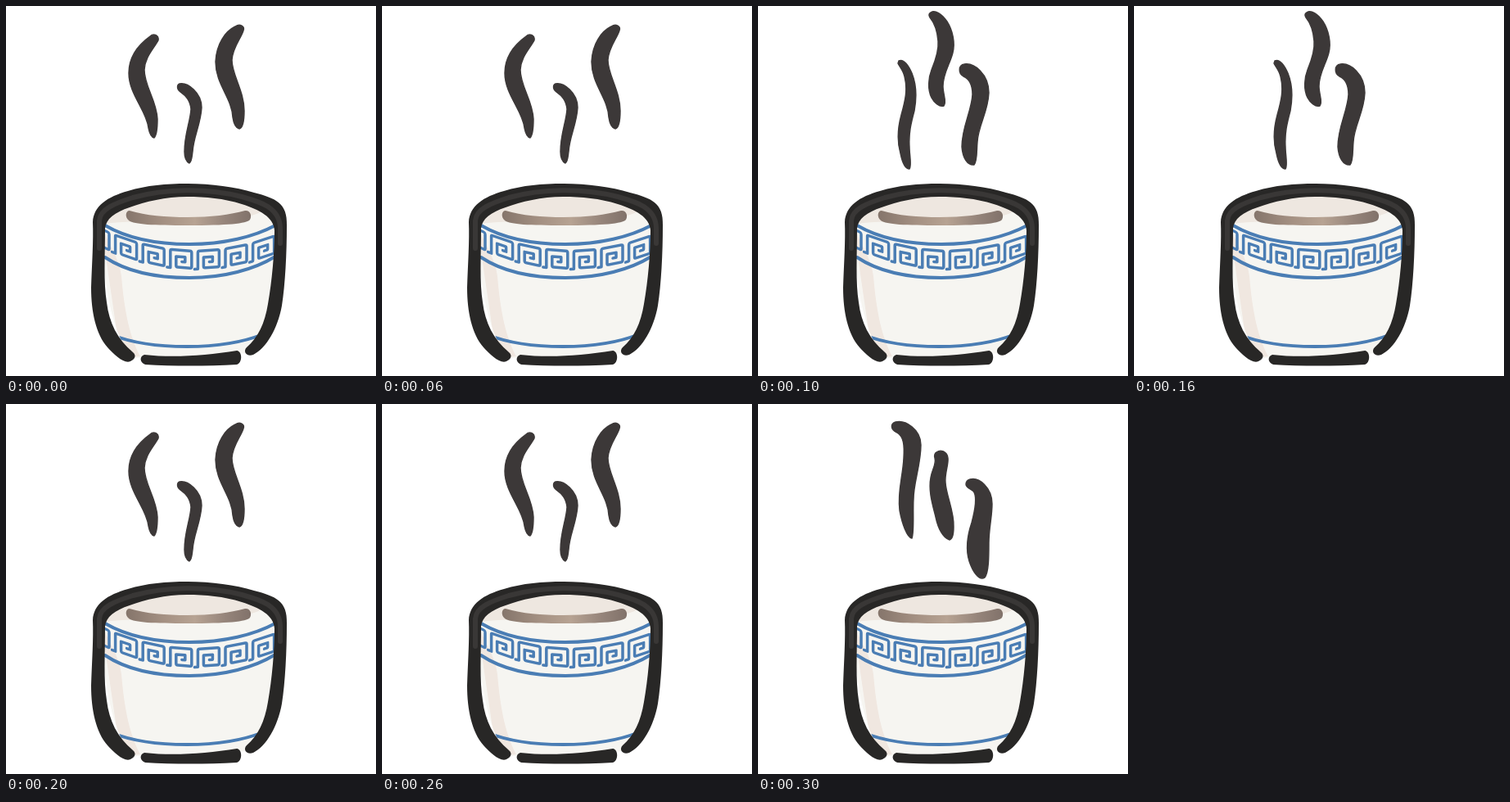
An HTML page for the animation above (0.4 s loop, 452 px wide and 452 px high).

```html
<!DOCTYPE html>
<html lang="en">
<head>
<meta charset="utf-8">
<title>Steaming tea cup</title>
<style>
  html, body { margin: 0; width: 100%; height: 100%; overflow: hidden; background: #fff; }
  svg { display: block; width: 100vw; height: 100vh; }
  .steam { fill: #3c3838; stroke: #3c3838; stroke-width: 1.4; opacity: 0; }
  .blue { fill: none; stroke: #4a7db4; stroke-width: 4; stroke-linecap: round; stroke-linejoin: round; }
  .ink { fill: #282726; }
</style>
</head>
<body>
<svg viewBox="0 0 452 452">
  <defs>
    <linearGradient id="tea">
      <stop offset="0" stop-color="#85756b"/>
      <stop offset=".3" stop-color="#a49082"/>
      <stop offset=".55" stop-color="#b7a393"/>
      <stop offset=".8" stop-color="#95847a"/>
      <stop offset="1" stop-color="#81726a"/>
    </linearGradient>
    <clipPath id="body">
      <path d="M117 262C124 246 165 226 221 226C278 226 324 244 330 264C333 320 324 390 300 424L155 430C128 402 117 330 117 262Z"/>
    </clipPath>
  </defs>

  <g clip-path="url(#body)">
    <rect x="110" y="220" width="230" height="220" fill="#f6f5f1"/>
    <path fill="#eee7e0" d="M120 266C135 240 180 230 221 230C265 230 300 239 314 250C302 258 270 264 221 264C180 264 150 262 120 266Z"/>
    <path fill="#f0e7e0" d="M116 266C124 290 138 306 141 330C144 365 149 400 164 428L140 430Z"/>
  </g>

  <path fill="url(#tea)" d="M151 250C171 256 195 258 222 258C250 258 274 255 292 250C298 249 301 256 298 261C294 266 270 268 222 268C180 268 157 267 150 262C145 258 146 250 151 250Z"/>

  <g clip-path="url(#body)" class="blue">
    <path d="M121 268C145 282 180 291 224 291C266 291 303 282 329 268"/>
    <path d="M121 307C145 323 180 332 224 332C266 332 303 322 329 306"/>
    <path d="M130 402C155 412 187 416 221 416C256 416 289 411 314 401"/>
    <g id="frieze" stroke-width="3.5"></g>
  </g>

  <path class="ink" d="M152 434C145 438 132 426 124 417C110 401 104 374 104 344C105 315 107 286 106 264C107 244 124 233 149 226C172 219 195 217 222 217C251 217 280 221 303 228C330 235 344 241 343 268C343 303 341 340 337 366C332 394 318 418 302 426C294 429 289 422 294 417C308 405 316 388 320 364C325 336 328 302 328 274C327 258 310 249 288 242C266 235 244 233 221 233C195 233 170 239 151 246C133 252 122 260 121 272C121 305 119 338 123 362C126 387 136 407 155 423C160 427 157 432 152 434Z"/>
  <path fill="none" stroke="#393736" stroke-width="6" stroke-linecap="round" d="M114 296V262C115 248 133 241 155 234C195 223 245 222 288 233C310 239 335 246 335 272V290"/>
  <path class="ink" d="M169 426C205 430 244 427 282 421C289 422 289 436 282 438C245 440 204 440 170 438C163 435 163 428 169 426Z"/>

  <g id="sway" class="steam">
    <path d="M176 37C180 33 187 35 186 42C180 53 170 62 169 78C169 98 184 115 185 138C185 148 184 158 181 161C177 160 175 154 174 149C172 128 150 108 150 82C150 62 162 47 176 37Z"/>
    <path d="M280 25C286 21 292 25 290 30C287 40 277 50 276 66C276 84 291 104 291 128C291 138 290 149 285 150C280 149 278 143 277 136C276 112 256 96 256 68C257 46 268 31 280 25Z"/>
    <path d="M212 95C222 93 239 106 239 124C238 144 229 160 228 178C227 185 227 190 224 192C220 190 218 186 218 178C218 156 225 142 226 126C225 115 220 110 213 105C208 101 209 96 212 95Z"/>
  </g>
  <g id="rise" class="steam">
    <path d="M211 8C216 4 225 10 231 19C238 30 241 45 238 57C235 70 226 82 226 98C226 108 231 117 227 122C222 124 215 118 212 112C207 102 208 88 212 78C217 66 221 55 220 43C219 29 215 20 210 14C208 11 209 9 211 8Z"/>
    <path d="M172 67C178 64 184 73 188 82C194 97 194 112 191 128C187 143 184 155 185 172C185 182 188 195 185 199C180 199 176 190 174 180C169 163 171 148 175 133C180 115 183 102 179 86C177 78 172 73 171 70Z"/>
    <path d="M252 71C264 69 282 83 282 106C281 130 269 146 268 166C267 176 268 190 264 194C256 195 250 186 249 172C249 148 261 128 262 108C262 95 258 89 251 86C244 82 245 72 252 71Z"/>
  </g>
  <g id="drift" class="steam">
    <path d="M168 22C180 19 199 31 199 50C199 74 190 96 190 116C189 132 191 156 188 164C182 163 176 146 173 130C170 108 177 88 178 66C179 50 178 40 170 35C161 31 162 24 168 22Z"/>
    <path d="M218 59C223 55 231 58 232 66C233 74 228 84 229 96C230 112 240 132 239 150C239 158 238 165 234 166C226 164 220 152 217 138C213 122 208 106 211 90C213 78 218 74 216 66C215 63 216 60 218 59Z"/>
    <path d="M259 92C270 89 286 102 286 122C286 138 282 152 282 170C282 186 282 206 277 212C270 217 262 204 258 192C253 176 256 160 261 145C265 130 268 116 264 108C262 104 254 103 254 98C254 95 256 93 259 92Z"/>
  </g>
</svg>
<script>
  const STEP = 100;
  const SEQUENCE = ['sway', 'rise', 'sway', 'drift'];
  const byId = id => document.getElementById(id);

  // Key pattern: one spiral repeated along the curve of the band.
  const SPIRAL = 'M-17 11H-13V-9Q-13 -11 -11 -11H11Q13 -11 13 -9V8Q13 10 11 10H-4Q-6 10 -6 8V-3H5V3H1';
  for (let i = 0; i < 7; i++) {
    const x = 113 + i * 33.6;
    const dx = x - 232;
    const y = 310 - dx * dx / 500;
    const tilt = Math.atan(-dx / 250) * 180 / Math.PI;
    const spiral = document.createElementNS('http://www.w3.org/2000/svg', 'path');
    spiral.setAttribute('d', SPIRAL);
    spiral.setAttribute('transform', `translate(${x} ${y}) skewY(${tilt})`);
    byId('frieze').append(spiral);
  }

  for (const id of new Set(SEQUENCE)) {
    const shown = [...SEQUENCE, SEQUENCE[0]].map(name => Number(name === id));
    byId(id).animate(
      shown.map((opacity, i) => ({ opacity, offset: i / SEQUENCE.length, easing: 'step-end' })),
      { duration: STEP * SEQUENCE.length, iterations: Infinity }
    ).startTime = 0;
  }
</script>
</body>
</html>
```
